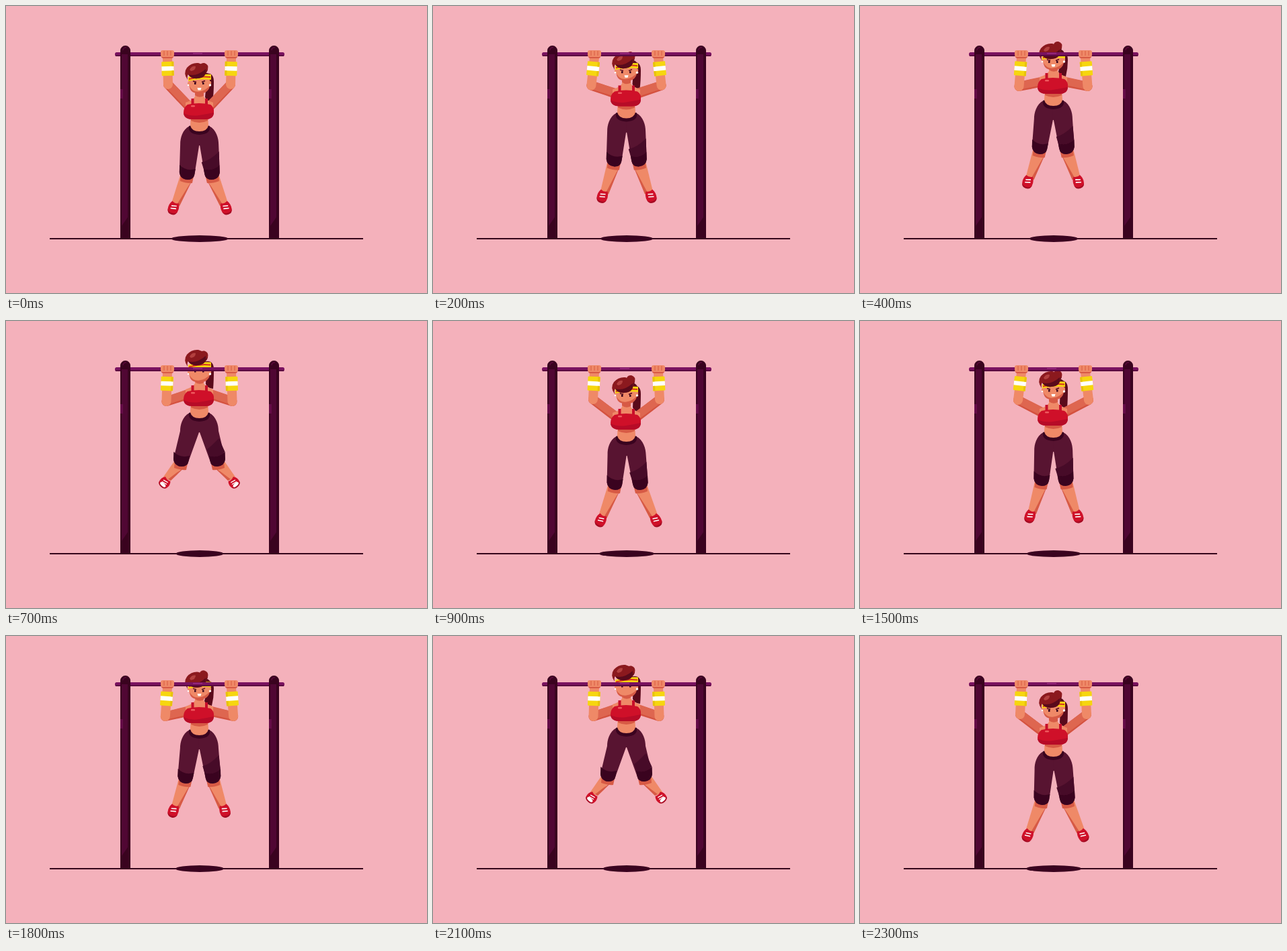
An HTML page that plays this animation: 626 px wide and 428 px high, repeating every 2400 ms.

```html
<!DOCTYPE html>
<html lang="en">
<head>
<meta charset="utf-8">
<title>Pull-ups</title>
<style>
  html, body { margin: 0; width: 100%; height: 100%; overflow: hidden; background: #f4b1bb; }
  svg { display: block; width: 626px; height: 428px; }
  .skin { fill: #ef8967; }
  .shade { fill: #d75a45; }
  .dark { fill: #3a031f; }
  .hair { fill: #8b191e; }
  .hairDark { fill: #5a0a1b; }
  .red { fill: #cf1029; }
  .yellow { fill: #f6d60f; }
  .white { fill: #fff; }
  .arm { fill: none; stroke-linecap: round; stroke-linejoin: round; }
</style>
</head>
<body>
<svg viewBox="0 0 626 428" xmlns="http://www.w3.org/2000/svg">
  <rect width="626" height="428" fill="#f4b1bb"/>
  <rect x="65" y="346" width="466" height="2" fill="#35041b"/>
  <ellipse id="shadow" class="dark" cx="288" cy="347" ry="5"/>

  <path id="pony" class="hairDark"/>

  <g id="arm">
    <path id="armShade" class="arm" stroke="#d4523f" stroke-width="14"/>
    <path id="armLight" class="arm" stroke="#de6650" stroke-width="12"/>
    <path id="forearm" class="arm" stroke="#ef8967" stroke-width="14"/>
    <g id="band">
      <rect class="yellow" x="-9" y="9" width="18" height="21" rx="1"/>
      <rect class="white" x="-9" y="16" width="18" height="6.500"/>
      <path d="M6 9h3v7h-3zM6 22.500h3v7.500h-3z" fill="#e8c20b"/>
    </g>
  </g>
  <use href="#arm" transform="translate(575) scale(-1 1)"/>

  <g id="legs">
    <g id="leg">
      <path id="shin" class="skin"/>
      <path id="shinShade" class="shade"/>
      <g id="shoe">
        <path class="red" d="M-5-9Q0-6 5-9Q9-3 7.500 4.500Q5.500 10 0 10Q-6 10-7.500 4.500Q-9-3-5-9Z"/>
        <path d="M-7.500 4Q-6 8 0 8T7.500 4Q6.500 10.500 0 10.500T-7.500 4Z" fill="#a50b23"/>
        <path d="M-4-2L3.500-4M-4 2L4 0" stroke="#fff" stroke-width="1.600"/>
        <ellipse id="sole" class="white" cx="0" cy="5" rx="5" ry="3"/>
      </g>
      <path id="trouser" fill="#581431"/>
      <path id="hem" class="dark"/>
    </g>
    <use href="#leg" transform="translate(575) scale(-1 1)"/>
    <path id="thighShade" fill="#470b28"/>
  </g>

  <g id="torso">
    <path class="dark" d="M272 22Q287.500 16 303 22Q305 34 287.500 35Q270 34 272 22Z"/>
    <path class="skin" d="M275 6H300L301 21Q299 30 287.500 30T274 21Z"/>
    <path class="shade" d="M275 8H300V14Q287.500 20 275 14Z"/>
    <path class="skin" d="M281-33H294V-22Q296-17 308-13V2H267V-13Q279-17 281-22Z"/>
    <path class="shade" d="M281-28H294V-23Q287-19 281-24Z"/>
    <path d="M277.500-19V-7M298-19V-7" stroke="#c70f2b" stroke-width="4"/>
    <path class="red" d="M270-10Q287-14 304-10Q310-6 309 2Q308 12 296 12H278Q265 12 264 2Q264-6 270-10Z"/>
    <path d="M264 3Q275 8 287 6T309 2Q309 12 296 12H278Q265 12 264 3Z" fill="#b70b27"/>
    <rect x="275" y="-9" width="6" height="2.500" rx="1.200" fill="#ef5a5f"/>
  </g>

  <g id="head">
    <path class="hairDark" d="M288-58Q306-60 304-46L300-38L286-50Z"/>
    <path class="skin" d="M272-50H303V-40Q302-27 287.500-27T272-40Z"/>
    <path class="shade" d="M273-37Q278-28 287.500-29.500T303-38Q301-26.500 287.500-26.500T273-37Z"/>
    <path class="skin" d="M301-45q5-1 4 4t-5 4zM273-45q-3 0-3 4t4 3z"/>
    <circle class="white" cx="303.500" cy="-39" r="1.700"/>
    <circle class="white" cx="271" cy="-39" r="1.300"/>
    <path id="mouth" class="white" d="M284.500-35h6l-1 3.500h-4z"/>
    <g id="brow">
      <path d="M278-45l5 1.500M291-43.500l5-2" stroke="#50071d" stroke-width="1.400"/>
      <path d="M280-43h2.500v3h-2.500zM292-43h2.500v3h-2.500z" fill="#38051d"/>
      <path class="yellow" d="M271-51Q288-56 305-55V-47Q288-49 271-45Z"/>
      <path d="M272-48Q288-53 304-51" fill="none" stroke="#d8341f" stroke-width="2"/>
      <path class="hair" d="M287-64Q288-73 295-72Q302-70 300-62Q298-56 290-55Z"/>
      <path class="hairDark" d="M290-66Q294-60 291-55Q298-55 300-62Q297-59 294-59Q294-64 290-66Z"/>
    </g>
    <g id="fringe">
      <path class="hair" d="M270-47Q263-57 269-65Q276-73 286-72Q298-69 298-60Q297-50 285-49Q275-48 271-55Q269-53 270-47Z"/>
      <path class="hairDark" d="M271-55Q283-51 297-63Q299-50 285-49Q275-48 271-55Z"/>
      <path d="M273-62Q276-68 282-67Q282-61 275-60Z" fill="#b3403f"/>
    </g>
  </g>

  <rect x="162" y="69" width="252" height="6" rx="2.500" fill="#7a1260"/>
  <path d="M163 73H413V75H163Z" fill="#5a083f"/>
  <rect x="278" y="70" width="14" height="1.500" fill="#9b2c80"/>

  <g id="pole">
    <path class="dark" d="M170 347V66.500a7.500 7.500 0 0 1 15 0V347Z"/>
    <path d="M172 72H181V315L172 328Z" fill="#500733"/>
    <path d="M174 66a4 4 0 0 1 5-4" fill="none" stroke="#5c0a3c" stroke-width="1.500"/>
    <rect x="170" y="124" width="4" height="14" fill="#640c47"/>
  </g>
  <use href="#pole" x="221"/>

  <g id="fist">
    <rect class="shade" x="231" y="70" width="18" height="8" rx="3"/>
    <rect class="skin" x="230" y="66" width="20" height="10" rx="3"/>
    <path d="M235 67v7M240 67v7M245 67v7" stroke="#d75a45"/>
  </g>
  <use href="#fist" transform="translate(575) scale(-1 1)"/>
</svg>
<script>
const LOOP = 2400, STEP = 100;
const el = id => document.getElementById(id);
const set = (id, name, value) => el(id).setAttribute(name, value);
const shift = (id, y) => set(id, 'transform', `translate(0 ${y})`);

// body y, head shift, nod, elbow x/y, knee x, foot x, foot drop, shoe turn, ponytail x, leg sway
const hang = [157, 0, 0, 241, 117, 269.5, 248.5, 144, 20, 303, .3];
const low  = [163, 0, 3, 251, 116, 269, 249.5, 146, 14, 311, 0];
const dead = [165, 0, 3, 252, 116, 269, 249.5, 146, 14, 309, 0];
const pull = [144, 0, 3, 235, 118, 270, 252, 147, 18, 304, .4];
const chin = [119, 3, 6, 236.5, 120, 268, 250, 143, 16, 302, -.2];
const peak = [115, 3, 0, 238, 120, 266, 247, 140, 24, 302, 0];
const kick = [115, 3, -3, 238.5, 120, 261, 236, 126, 42, 304, 0];
const drop = [134, 2, 2, 237, 119, 265, 241, 138, 32, 303, .7];
const fall = [150, 0, 6, 238, 117, 269, 246.5, 147, 26, 304, 1.4];

const keys = [
  [0, hang], [130, pull], [400, chin], [520, peak], [700, kick], [800, drop],
  [900, fall], [1000, hang], [1100, low], [1200, dead], [1370, hang], [1500, pull],
  [1770, chin], [1900, peak], [2100, kick], [2200, drop], [2300, fall], [2400, hang]
];

function poseAt(t) {
  const i = keys.findIndex(k => k[0] > t);
  const [t0, a] = keys[i - 1], [t1, b] = keys[i];
  const p = (t - t0) / (t1 - t0);
  return a.map((v, n) => v + (b[n] - v) * p);
}

function drawArm(y, ex, ey) {
  set('armShade', 'd', `M${ex} ${ey}L273 ${y - 6}`);
  set('armLight', 'd', `M${ex} ${ey - 1}L273 ${y - 8}`);
  set('forearm', 'd', `M240 77L${ex} ${ey}`);
  const turn = Math.atan2(240 - ex, ey - 74) * 180 / Math.PI;
  set('band', 'transform', `translate(240 74) rotate(${turn})`);
}

function drawLegs(y, kx, fx, drop, turn, sway) {
  const ky = y + 93, fy = y + drop, ax = fx + 3, ay = fy - 5;
  set('shin', 'd', `M${kx - 10} ${ky}H${kx + 10}L${ax + 6} ${ay + 2}L${ax - 6} ${ay - 2}Z`);
  set('shinShade', 'd',
    `M${kx - 10} ${ky}H${kx + 10}L${kx + 7} ${ky + 14}Q${kx} ${ky + 15} ${kx - 11} ${ky + 11}Z` +
    `M${kx + 9} ${ky + 6}L${ax + 6} ${ay + 2}L${ax + 2} ${ay}Z`);
  const tuck = Math.max(0, (turn - 26) / 16);
  set('shoe', 'transform', `translate(${fx} ${fy}) rotate(${turn}) scale(1 ${1 - .2 * tuck})`);
  set('sole', 'opacity', tuck > .6 ? 1 : 0);

  const cuff = `Q${kx - 11} ${ky + 8} ${kx} ${ky + 9}Q${kx + 9} ${ky + 9} ${kx + 10.5} ${ky + 1}`;
  set('trouser', 'd',
    `M273 ${y + 22}C262 ${y + 27} 259 ${y + 41} 259 ${y + 49}L${kx - 12} ${ky - 2}${cuff}` +
    `L287 ${y + 51}H288V${y + 28}Z`);
  set('hem', 'd',
    `M${kx - 11.7} ${ky - 13}Q${kx - 2} ${ky - 3} ${kx + 12} ${ky - 7}L${kx + 10.5} ${ky + 1}` +
    `Q${kx + 9} ${ky + 9} ${kx} ${ky + 9}Q${kx - 11} ${ky + 8} ${kx - 12} ${ky - 2}Z`);

  const rx = 575 - kx;
  set('thighShade', 'd',
    `M316.500 ${y + 60}Q304 ${y + 73} ${rx - 15} ${y + 76}L${rx - 12} ${ky - 7}` +
    `Q${rx + 2} ${ky - 3} ${rx + 11.5} ${ky - 13}Z`);

  const hip = y + 25;
  set('legs', 'transform', `translate(0 ${hip}) skewX(${sway}) translate(0 ${-hip})`);
}

function drawHead(y, head, nod, px) {
  const hy = y + head, top = hy + nod / 2;
  shift('head', hy);
  shift('brow', nod / 2);
  shift('fringe', nod);
  set('pony', 'd',
    `M296 ${top - 56}Q309 ${top - 59} 309 ${top - 44}Q309 ${y - 26} ${px + 4} ${y - 14}` +
    `Q${px - 5} ${y - 15} ${px - 7} ${y - 21}Q298 ${top - 36} 296 ${top - 56}Z`);
}

function draw(now) {
  const t = Math.floor(now % LOOP / STEP) * STEP;
  const [y, head, nod, ex, ey, kx, fx, drop, turn, px, sway] = poseAt(t);
  drawArm(y, ex, ey);
  drawLegs(y, kx, fx, drop, turn, sway);
  drawHead(y, head, nod, px);
  shift('torso', y);
  set('mouth', 'opacity', turn > 25 ? 0 : 1);
  set('shadow', 'rx', 35.5 + (y - 115) / 6);
}

const start = performance.now();
function tick() {
  draw(performance.now() - start);
  requestAnimationFrame(tick);
}
draw(0);
requestAnimationFrame(tick);
</script>
</body>
</html>
```
